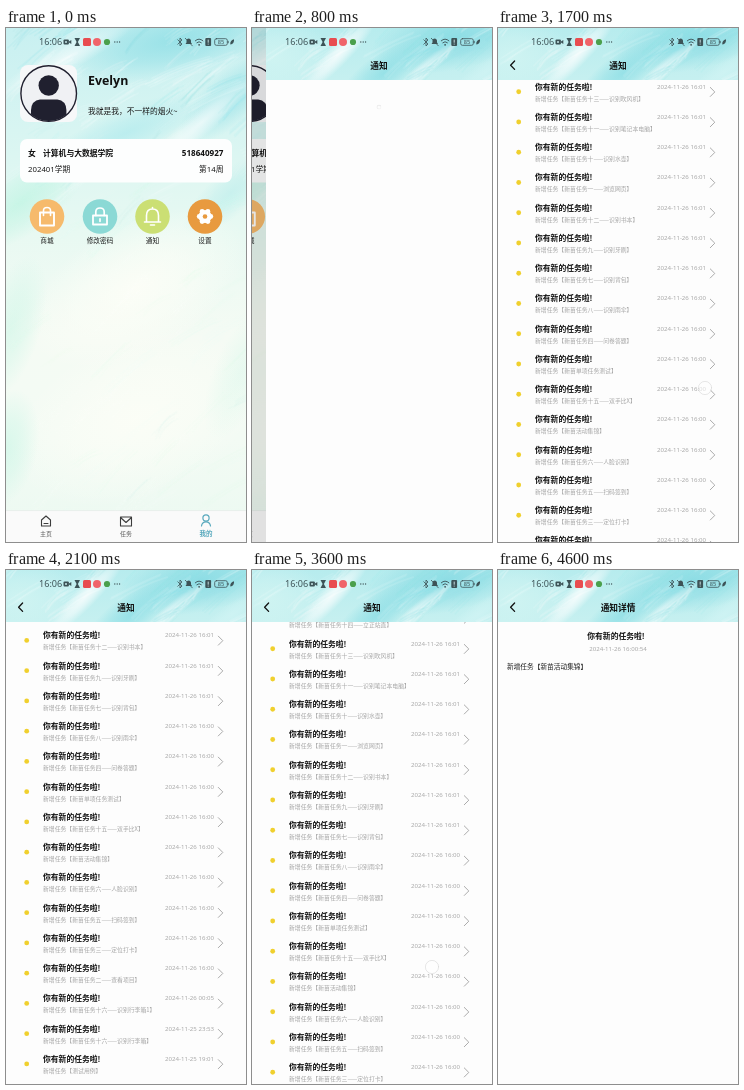
Animation, 240 px wide and 514 px high, one loop 4900 ms. Source, as an HTML page with a canvas:

```html
<!DOCTYPE html>
<html lang="zh">
<head>
<meta charset="utf-8">
<title>通知</title>
<style>
html, body { margin: 0; width: 100%; height: 100%; overflow: hidden; background: #fdfdfd; }
canvas { display: block; width: 240px; height: 514px; }
</style>
</head>
<body>
<canvas id="stage"></canvas>
<script>
const W = 240, H = 514, LOOP = 4900, HEAD = 52, PITCH = 30.25;
const FONT = '"Noto Sans CJK SC", "Noto Sans CJK", "Noto Sans", sans-serif';
const LATIN = '"Noto Sans", "Noto Sans CJK SC", sans-serif';
const dpr = Math.max(1, window.devicePixelRatio || 1);

function makeCanvas(el, w, h) {
  el.width = w * dpr;
  el.height = h * dpr;
  const c = el.getContext('2d');
  c.scale(dpr, dpr);
  c.lineCap = c.lineJoin = 'round';
  return c;
}
const g = makeCanvas(document.getElementById('stage'), W, H);

// ---- drawing helpers ----
function text(s, x, y, size, color, o = {}) {
  g.font = `${o.weight || 400} ${size}px ${o.font || FONT}`;
  g.textAlign = o.align || 'left';
  g.fillStyle = color;
  g.fillText(s, x, y + size * 0.37);
}
function disc(x, y, r, color) {
  g.beginPath();
  g.arc(x, y, r, 0, Math.PI * 2);
  g.fillStyle = color;
  g.fill();
}
function ring(x, y, r, color, width) {
  g.beginPath();
  g.arc(x, y, r, 0, Math.PI * 2);
  g.strokeStyle = color;
  g.lineWidth = width;
  g.stroke();
}
function box(x, y, w, h, r, color) {
  g.beginPath();
  g.roundRect(x, y, w, h, r);
  g.fillStyle = color;
  g.fill();
}
function line(d, color, width = 1) {
  g.strokeStyle = color;
  g.lineWidth = width;
  g.stroke(new Path2D(d));
}
function shape(d, color) {
  g.fillStyle = color;
  g.fill(new Path2D(d));
}
function at(x, y, draw) {
  g.save();
  g.translate(x, y);
  draw();
  g.restore();
}

// ---- watercolour backgrounds ----
function random(seed) {
  return () => (seed = (seed * 16807) % 2147483647) / 2147483647;
}
function paint(h, stops, blobs, strokes, seed) {
  const el = document.createElement('canvas');
  const c = makeCanvas(el, W, h), rnd = random(seed);
  const base = c.createLinearGradient(0, 0, 0, h);
  stops.forEach((s, i) => base.addColorStop(i / (stops.length - 1), s));
  c.fillStyle = base;
  c.fillRect(0, 0, W, h);
  for (const [x, y, rx, ry, turn, rgb, alpha] of blobs) {
    c.save();
    c.translate(x, y);
    c.rotate(turn);
    c.scale(rx, ry);
    const f = c.createRadialGradient(0, 0, 0, 0, 0, 1);
    f.addColorStop(0, `rgba(${rgb},${alpha})`);
    f.addColorStop(0.5, `rgba(${rgb},${alpha * 0.6})`);
    f.addColorStop(1, `rgba(${rgb},0)`);
    c.fillStyle = f;
    c.fillRect(-1, -1, 2, 2);
    c.restore();
  }
  // Each stroke is a bundle of fine bristle lines, fainter further down.
  for (let i = 0; i < strokes; i++) {
    const x = rnd() * W, y = rnd() * h, len = 20 + rnd() * 45;
    const a = -0.85 + rnd() * 0.5, dx = Math.cos(a) * len, dy = Math.sin(a) * len;
    const deep = Math.max(0.25, 1 - y / 260);
    const tone = y < 160 ? '130,220,226' : '190,242,222';
    c.strokeStyle = `rgba(${rnd() < 0.6 ? WHITE : tone},${(0.05 + rnd() * 0.13) * deep})`;
    c.lineWidth = 1.6;
    for (let j = 0, n = 2 + rnd() * 5; j < n; j++) {
      const s = (rnd() - 0.5) * 10;
      c.beginPath();
      c.moveTo(x + s, y + j * 1.5);
      c.quadraticCurveTo(x + dx * 0.5, y + dy * 0.5 - 3 + j * 1.5, x + dx + s, y + dy + j * 1.5);
      c.stroke();
    }
  }
  return el;
}
const TEAL = '140,222,229', MINT = '190,244,226', WHITE = '255,255,255', CREAM = '253,254,247';
const wall = paint(H, ['#c8f0f1', '#d8f5f2', '#e8f9f2', '#f5fbf4', '#f3fbf4', '#ebf9f1'], [
  [170, 12, 115, 38, -0.2, TEAL, 0.8],
  [225, 70, 65, 26, -0.7, TEAL, 0.6],
  [60, 30, 80, 14, -0.5, WHITE, 0.6],
  [195, 95, 75, 13, -0.7, WHITE, 0.65],
  [120, 105, 90, 24, -0.4, '175,234,237', 0.7],
  [15, 175, 75, 32, -0.6, MINT, 0.7],
  [225, 165, 60, 22, -0.7, '190,238,236', 0.7],
  [130, 260, 120, 65, -0.5, CREAM, 0.9],
  [5, 300, 30, 75, 0.3, MINT, 0.45],
  [130, 390, 130, 80, -0.4, CREAM, 0.8],
  [235, 345, 28, 70, 0.4, MINT, 0.25],
  [0, 420, 32, 60, 0.2, MINT, 0.5]
], 170, 77);
const banner = paint(HEAD, ['#b7ecee', '#c6f0f0'], [
  [195, 10, 85, 32, -0.2, '130,217,226', 0.8],
  [125, 45, 50, 20, -0.6, TEAL, 0.8],
  [15, 30, 60, 40, 0, '208,244,242', 0.9],
  [80, 26, 55, 11, -0.8, WHITE, 0.8],
  [165, 42, 45, 8, -0.7, WHITE, 0.6],
  [225, 45, 40, 11, -0.6, '208,244,244', 0.8]
], 24, 31);

// ---- profile page ----
const TILES = [
  [41, '商城', '#f6ba6c'], [94, '修改密码', '#8bd9d5'],
  [146.5, '通知', '#cbdf74'], [199, '设置', '#e89a3f']
];
const tileIcon = [
  () => {
    line('M-7 -4H7V9H-7Z', '#fff', 1.9);
    line('M-3.5 -1V-6Q-3.5 -9 0 -9T3.5 -6V-1', '#fff', 1.6);
  },
  () => {
    line('M-7 -1H7V8H-7Z', '#fff', 1.8);
    line('M-4.2 -1V-4.5Q-4.2 -8.5 0 -8.5T4.2 -4.5V-1M0 2.3V4.8', '#fff', 1.7);
  },
  () => line('M-8 5.5H8M-6 5V-1Q-6 -7.5 0 -7.5T6 -1V5M-2 8.5H2M0 -9V-8', '#fff', 1.6),
  () => {
    for (let i = 0; i < 6; i++) {
      const a = i * Math.PI / 3;
      disc(Math.cos(a) * 5.8, Math.sin(a) * 5.8, 2.4, '#fff');
    }
    disc(0, 0, 6.6, '#fff');
    disc(0, 0, 2.3, TILES[3][2]);
  }
];

function avatar() {
  box(14, 37, 57, 57, 8, '#f7f8f9');
  g.save();
  g.beginPath();
  g.arc(42.7, 65.5, 27.5, 0, 7);
  g.clip();
  disc(42.7, 65.5, 27.5, '#f0f1f4');
  disc(42.7, 57.5, 10.2, '#20202f');
  shape('M25 96V82Q25.5 72.5 34 71.5H51.4Q60 72.5 60.4 82V96Z', '#20202f');
  g.restore();
  ring(42.7, 65.5, 27.8, '#20202f', 1.4);
}

function tabs() {
  g.fillStyle = '#fafafa';
  g.fillRect(0, 483, W, 31);
  g.fillStyle = '#e6e8e8';
  g.fillRect(0, 482.5, W, 0.6);
  line('M35.5 492L40 488L44.5 492V498H35.5ZM38 495.5H42', '#3c3c3c', 1.1);
  line('M114.5 489H125.5V498H114.5ZM114.5 489.5L120 494.5L125.5 489.5', '#3c3c3c', 1.1);
  ring(200, 490, 3.1, '#58a9bd', 1.2);
  line('M195.5 498Q196 493.8 200 493.8T204.5 498', '#58a9bd', 1.2);
  text('主页', 40, 506, 6, '#555', { align: 'center' });
  text('任务', 120, 506, 6, '#555', { align: 'center' });
  text('我的', 200, 506, 6.5, '#58a9bd', { align: 'center', weight: 700 });
}

function profile() {
  g.drawImage(wall, 0, 0, W, H);
  avatar();
  text('Evelyn', 82, 52, 12.4, '#111', { weight: 700, font: LATIN });
  text('我就是我，不一样的烟火~', 82, 83, 7.75, '#1c1c1c', { weight: 500 });
  box(14, 111, 212, 43.5, 7, '#fdfefe');
  text('女', 22, 125, 7.8, '#111', { weight: 700 });
  text('计算机与大数据学院', 37, 125, 7.8, '#111', { weight: 700 });
  text('518640927', 217.5, 125, 8.1, '#111', { weight: 700, align: 'right', font: LATIN });
  text('202401学期', 22, 141, 7.8, '#1c1c1c', { weight: 500, font: LATIN });
  text('第14周', 217.5, 141, 7.8, '#1c1c1c', { weight: 500, align: 'right', font: LATIN });
  TILES.forEach(([x, label, color], i) => {
    disc(x, 188.5, 17.3, color);
    at(x, 188.5, tileIcon[i]);
    text(label, x, 213, 6.7, '#1c1c1c', { weight: 500, align: 'center' });
  });
  tabs();
}

// ---- notification list ----
const NEW = '你有新的任务啦!';
const task = s => [NEW, `新增任务【${s}】`];
const step = s => task('新苗任务' + s.replace(' ', '——'));
const ROWS = [
  ['任务审核不通过!', '审核不通过任务【新苗任务十——识别水壶】'],
  ['任务审核通过啦!', '审核通过任务【新苗任务六——人脸识别】'],
  task('观看极限编程的云站视频'), task('新苗支线任务汇总'),
  ...['十四 立正站直', '十三 识别吹风机', '十一 识别笔记本电脑', '十 识别水壶', '一 浏览网页',
    '十二 识别书本', '九 识别牙刷', '七 识别背包', '八 识别雨伞', '四 问卷答题'].map(step),
  task('新苗单项任务测试'), step('十五 双手比X'), task('新苗活动集锦'),
  ...['六 人脸识别', '五 扫码签到', '三 定位打卡', '二 查看项目', '十六 识别行李箱1', '十六 识别行李箱'].map(step),
  task('测试用例'), task('测试用例')
];
const LATE = ['26 00:05', '25 23:53', '25 19:01', '25 19:00'];
function stamp(i) {
  if (i > 20) return '2024-11-' + LATE[i - 21];
  return '2024-11-26 16:0' + (i === 0 ? 3 : i === 1 ? 2 : i < 12 ? 1 : 0);
}

function rows(scroll) {
  g.save();
  g.beginPath();
  g.rect(0, HEAD, W, H - HEAD);
  g.clip();
  ROWS.forEach(([title, note], i) => {
    const y = 64.5 + i * PITCH - scroll;
    if (y < 30 || y > H + 10) return;
    if (i > 1) disc(20.7, y + 5, 2.4, '#f0d02e');
    text(title, 37, y, 7.8, '#111', { weight: 700 });
    text(note, 37, y + 11.7, 5.85, '#a3a3a3');
    text(stamp(i), 208, y - 0.4, 6.1, '#a6a6a6', { align: 'right', font: LATIN });
    line(`M212.3 ${y + 0.7}L216.8 ${y + 5.2}L212.3 ${y + 9.7}`, '#a2a2a2', 0.9);
  });
  g.restore();
}

// A page shell whose content is centred in its visible part.
function page(left, title, body) {
  g.save();
  g.beginPath();
  g.rect(left, 0, W - left, H);
  g.clip();
  g.fillStyle = '#fdfdfd';
  g.fillRect(0, 0, W, H);
  body();
  g.drawImage(banner, left / 2, 0, W, HEAD);
  text(title, (left + W) / 2, 37.5, 8.7, '#111', { weight: 700, align: 'center' });
  if (!left) line('M16.6 33L12.6 37.2L16.6 41.4', '#111', 1.3);
  g.restore();
}

function spinner(left, t) {
  const x = (left + W) / 2;
  for (let i = 0; i < 8; i++) {
    const a = (i + t / 100) * Math.PI / 4;
    disc(x + Math.cos(a) * 1.8, 79 + Math.sin(a) * 1.8, 0.5, `rgba(150,150,150,${0.1 + i * 0.04})`);
  }
}

function detail() {
  text(NEW, 118, 66, 7.8, '#111', { weight: 700, align: 'center' });
  text('2024-11-26 16:00:54', 120, 78.5, 6.1, '#a6a6a6', { align: 'center', font: LATIN });
  text('新增任务【新苗活动集锦】', 9, 96.5, 6.7, '#1c1c1c', { weight: 500 });
}

// ---- status bar ----
function status() {
  const ink = '#3d5357';
  text('16:06', 33, 14, 9.1, ink, { font: LATIN });
  box(57.5, 11.5, 5.4, 5, 1, ink);
  shape('M63 13.5L65.3 11.9V16.1L63 14.5Z', ink);
  disc(60, 14, 1, '#c8e9ea');
  shape('M68.5 10H74L71.9 14L74 18H68.5L70.6 14Z', ink);
  box(77, 10, 8, 8, 1.5, '#e84c50');
  disc(91, 14, 4, '#f0646a');
  disc(101, 14, 3.1, '#4ba04d');
  for (let i = 0; i < 3; i++) disc(108.8 + i * 2.4, 14, 0.65, ink);

  line('M171.8 11.8L176 16L174 18V10L176 12L171.8 16.2', ink, 0.8);
  shape('M179.5 16H186L185 14.5V12.5Q184.5 10.5 182.7 10.5T180.5 12.5V14.5Z', ink);
  line('M179.3 10.3L186.3 17.8', ink, 0.8);
  line('M189.3 12.8Q193 9.3 196.9 12.8M190.8 14.7Q193 12.6 195.4 14.7', ink, 0.9);
  disc(193.1, 16.8, 0.9, ink);
  box(199.3, 10, 5.8, 8, 1, ink);
  line('M202.2 12V14.3M202.2 16V16.2', '#d5eff0', 0.9);
  g.beginPath();
  g.roundRect(208.7, 10.7, 12.6, 6.6, 1.7);
  g.strokeStyle = ink;
  g.lineWidth = 0.8;
  g.stroke();
  box(221.7, 12.7, 0.9, 2.6, 0.4, ink);
  text('85', 215, 14.1, 5.6, ink, { weight: 500, align: 'center', font: LATIN });
  shape('M224.3 16.5Q223.8 12.5 228 11.2Q228.6 15.7 224.3 16.5Z', ink);
}

// ---- motion ----
const SWIPES = [[1250, 1700, 157], [1700, 2400, 297], [3000, 3550, 142]];
const TOUCHES = [
  [200, 400, 147, 187, 147, 187],
  [1250, 1500, 204, 440, 206, 320],
  [1700, 1900, 207, 360, 210, 290],
  [3000, 3200, 193, 369, 190, 470],
  [3600, 3700, 180, 397, 180, 397]
];
const easeOut = u => 1 - (1 - u) ** 2;
const span = (t, a, b) => Math.min(1, Math.max(0, (t - a) / (b - a)));
const push = t0 => t => easeOut(span(t, t0, t0 + 395));
const openList = push(500), openDetail = push(4000);

function scrollAt(t) {
  return SWIPES.reduce((y, [a, b, to]) => y + (to - y) * easeOut(span(t, a, b)), 0);
}

function slide(p, under, over) {
  if (p < 1) {
    at(-48 * p, 0, under);
    g.fillStyle = `rgba(0,0,0,${0.11 * p})`;
    g.fillRect(0, 0, W, H);
  }
  if (p > 0) over(W * (1 - p));
}

function touch(t) {
  for (const [a, b, x0, y0, x1, y1] of TOUCHES) {
    if (t < a || t > b) continue;
    const u = span(t, a, b), x = x0 + (x1 - x0) * u, y = y0 + (y1 - y0) * u;
    disc(x, y, 6.6, 'rgba(255,255,255,0.6)');
    ring(x, y, 6.6, 'rgba(150,150,150,0.28)', 0.8);
  }
}

function draw(t) {
  const p = openList(t), q = openDetail(t);
  const list = left => page(left, '通知', () => t < 1000 ? spinner(left, t) : rows(scrollAt(t)));
  if (p < 1) slide(p, profile, list);
  else slide(q, () => list(0), left => page(left, '通知详情', () => t < 4500 ? spinner(left, t) : detail()));
  status();
  touch(t);
}

const start = performance.now();
function tick() {
  const t = (performance.now() - start) % LOOP;
  draw(Math.floor(t / 100) * 100);
  requestAnimationFrame(tick);
}
tick();
</script>
</body>
</html>
```
